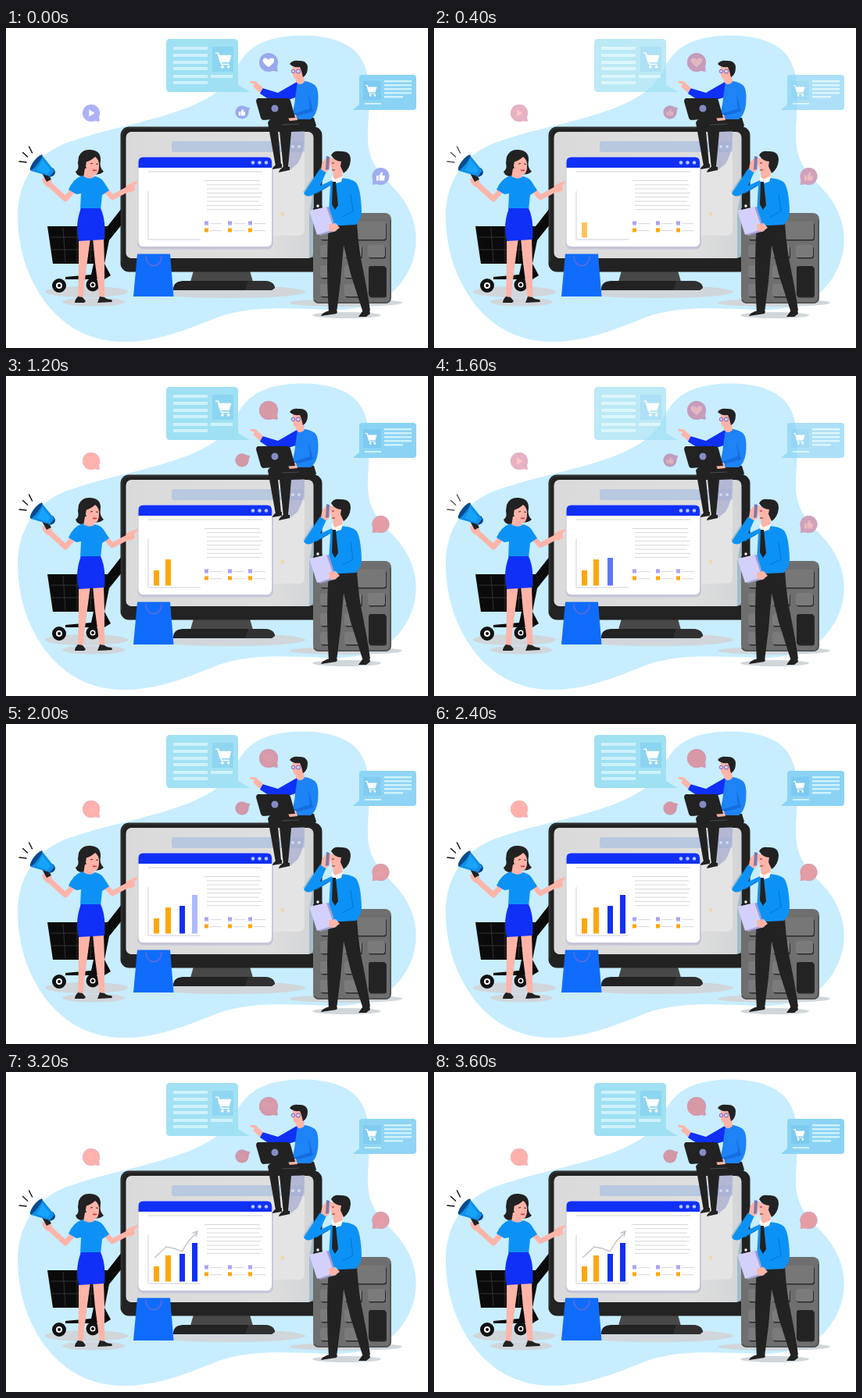
Recreate the animation shown at these times as an HTML page. Size 540 px wide and 410 px high, loop 3800 ms.

```html
<!DOCTYPE html>
<html lang="en">
<head>
<meta charset="utf-8">
<title>Online shopping</title>
<style>
html, body { margin: 0; width: 100%; height: 100%; overflow: hidden; background: #fff; }
svg { display: block; width: 540px; height: 410px; }
.ink { fill: #222; }
.sky { fill: #0c92f6; }
.blue { fill: #1030f8; }
.skin { fill: #ffb4a8; }
.limb { fill: none; stroke-linecap: round; stroke-linejoin: round; }
</style>
</head>
<body>
<svg viewBox="0 0 540 410">
  <defs>
    <linearGradient id="screen"><stop offset="0" stop-color="#dadada"/><stop offset=".75" stop-color="#dedede"/><stop offset="1" stop-color="#d3d5d7"/></linearGradient>
    <g id="trolley" fill="none" stroke="#fff" stroke-width="1.4">
      <path d="M-9-8h3l4 13h9"/>
      <path d="M-5.500-5h14l-2 7h-10z" fill="#fff"/>
      <circle cx="-1" cy="8" r="1"/><circle cx="6" cy="8" r="1"/>
    </g>
    <g id="thumb" fill="#fff">
      <path d="M-6-1h3v7h-3zM-2-1L1-6q3 0 1 5h4l-1 7h-7z"/>
    </g>
  </defs>

  <path fill="#c7edff" d="M15 240C15 200 36 160 84 145C142 125 205 117 250 94C302 70 286 42 323 21C350 6 416 3 445 28C475 55 462 107 463 143C465 185 490 192 509 221C530 253 530 291 508 323C486 355 453 362 410 361C357 359 310 356 270 371C230 387 194 402 152 402C98 402 62 374 39 334C23 306 15 274 15 240Z"/>

  <!-- ground shadows -->
  <g fill="#d0d6da">
    <ellipse cx="103" cy="338" rx="53" ry="7"/>
    <ellipse cx="112" cy="351" rx="40" ry="5.500"/>
    <ellipse cx="285" cy="338" rx="98" ry="8"/>
    <ellipse cx="435" cy="352" rx="72" ry="5"/>
    <ellipse cx="436" cy="368" rx="44" ry="4"/>
  </g>

  <!-- shopping cart -->
  <path style="fill:#0b0b0b" d="M53 254H130L148 231V252L132 272L126 302L134 317L126 322H76V319L109 316L112 302H60Z"/>
  <path fill="none" stroke="#3c3c3c" stroke-width=".8" d="M57 268h70M58 284h68M73 256l3 44M91 256v44M110 256l-2 44"/>
  <g fill="#fff" stroke="#111" stroke-width="5"><circle cx="68" cy="330" r="6.500"/><circle cx="111" cy="329" r="6"/></g>
  <circle cx="68" cy="330" r="2"/><circle cx="111" cy="329" r="2"/>

  <!-- monitor -->
  <path fill="#484848" d="M240 311h72l4 14h-80z"/>
  <path class="ink" d="M214 335q0-10 12-11h103q14 0 15 9l-4 3H214z"/>
  <path fill="#303030" d="M310 324h19q14 0 15 9l-4 3h-34z"/>
  <rect class="ink" x="146.500" y="126.500" width="258" height="186" rx="11"/>
  <path fill="none" stroke="#3d3d3d" d="M148 300V139q0-11 11-11h234"/>
  <rect x="153.500" y="133" width="240" height="162" rx="7" fill="url(#screen)"/>
  <path fill="#e4e4e4" d="M340 158h42v100q0 8-8 8h-34z"/>
  <rect x="212" y="145" width="170" height="14" rx="3" fill="#b7c8df"/>
  <path fill="#a7acd0" d="M363 132h19q1 26-9 42l-11 9z" opacity=".75"/>
  <g fill="#cfd9ee"><circle cx="367" cy="152" r="2"/><circle cx="375" cy="152" r="2"/></g>
  <circle cx="354" cy="238" r="2.500" fill="#efd9b0"/>
  <path fill="#91b3c2" d="M380 210l14-21v105h-6v-58l4-20z" opacity=".7"/>

  <!-- browser window -->
  <rect x="168.500" y="168" width="173.500" height="115.500" rx="7" fill="#bdbddb" opacity=".7"/>
  <rect x="169.500" y="165.500" width="170.500" height="114.500" rx="6" fill="#fff"/>
  <path class="blue" d="M169.500 179v-7.500q0-6 6-6h158.500q6 0 6 6v7.500z"/>
  <g fill="#b7c7ff"><circle cx="316" cy="172.500" r="2.300"/><circle cx="324.500" cy="172.500" r="2.300"/><circle cx="333" cy="172.500" r="2.300"/></g>
  <path fill="none" stroke="#e1e1e4" stroke-width="1.500" d="M182 184h146M182 209v62h67"/>
  <g id="copy"></g>
  <g id="bars"></g>
  <g id="trend" fill="none" stroke="#c3c3cf" stroke-width="1.400">
    <path d="M190 238L205 224L215 226L225 230L234 216L244 206M238.500 206.500L245 204L243 211"/>
  </g>

  <!-- bag -->
  <path fill="#0f6cfb" d="M168 289.500h42l4.500 54.500h-51.500z"/>
  <path fill="none" stroke="#5b6dd8" stroke-width="1.500" d="M179 292c0 17 20 17 20 0"/>

  <!-- calculator -->
  <rect x="393" y="237" width="100" height="116" rx="8" fill="#6f6f6f"/>
  <path fill="none" stroke="#555" stroke-width="2" d="M394 348q2 4 7 4h84q7 0 7-7V246"/>
  <g id="keys"></g>

  <!-- woman -->
  <path class="skin" d="M93 269h15l-4 30l-6 48h-6l1-47zM111 269h14l1 32v46h-6l-6-46z"/>
  <path class="ink" d="M92 344l6 1l4 5l-2 2H88q0-4 4-8zM120 344l6 1q3 3 9 3l1 3l-19 1z"/>
  <path class="limb" stroke="#ffb4a8" stroke-width="7" d="M86 208L76 219L54 199"/>
  <path class="limb" stroke="#ffb4a8" stroke-width="6.500" d="M127 207L136 217L157 206"/>
  <path class="skin" d="M154 202l8-4l6-2v2l-4 4l1 6l-7 3z"/>
  <path class="skin" d="M46 193l7-3l6 7l-4 7q-8-2-9-11z"/>
  <path class="ink" d="M93 165Q97 155 108 156Q122 157 121 170Q119 178 125 184Q119 189 112 187L98 190Q91 190 89 184Q94 181 92 173Z"/>
  <path class="skin" d="M101 180h11l1 12q-5 7-14 0z"/>
  <path class="skin" d="M103 170q7-1 11-5q6 4 5 13q0 10-7 10q-8-1-10-11z"/>
  <path class="ink" d="M101 172q9-2 13-8l-3-6l-11 4z"/>
  <path fill="none" stroke="#4b2525" d="M108 174l3-.500M115 174l3 .500"/>
  <path fill="none" stroke="#e42c45" stroke-width="1.400" d="M111 182q3 1 5 0"/>
  <path class="sky" d="M98 189q9 7 16 1q8 2 11 7l7 11l-9 6l-2 19H95l1-21l-6 1l-10-6q6-14 18-18z"/>
  <path class="blue" d="M96 231h25q7 14 5 40l-33 2q-5-22 3-42z"/>

  <!-- megaphone -->
  <path class="ink" d="M46 186l6-2l6 10l-6 3z"/>
  <path fill="#083f82" d="M53 180q7-4 10 4q0 7-9 7z"/>
  <path fill="#0e8fe6" d="M46 163L62 183L56 190L32 183Z"/>
  <path fill="#064a8f" d="M46 162q2 2-3 9t-11 12q-3-2 2-10t12-11z"/>
  <path fill="#18a3fb" d="M46 168l11 14l-4 5l-14-5q5-6 7-14z"/>
  <path id="shout" class="limb" stroke="#111" stroke-width="1.500" d="M29.500 152l4 8M21.500 159.500l6 5.500M17 171l9 1"/>

  <!-- seated man -->
  <path class="blue" d="M374 68L348 83L328 77L325 84L345 97L374 88Z"/>
  <path class="skin" d="M329 77l-10-9l-6 0l-1 2l6 2l-2 3l9 8z"/>
  <path class="ink" d="M335 121q2-6 14-6h45l3 10q-2 6-12 7l-20 1l-4 46l-6 1l-5-48l-2 0l4 43l-7 2z"/>
  <path fill="none" stroke="#4a4a4a" d="M353 124l22-1"/>
  <path class="ink" d="M347 174l6 0v5l-12 2q0-3 6-7zM356 177l7 1v4l-14 3q0-3 7-8z"/>
  <path fill="#1d83f6" d="M373 68q14-1 22 5q6 5 4 26q-2 13-9 18h-25l4-19z"/>
  <path fill="#146de0" d="M387 85l2 18l-21 7l2 3l23-6z"/>
  <path class="skin" d="M369 61h12l1 8q-5 6-10 1zM360 113l11-2l2 7l-10 1z"/>
  <path class="skin" d="M367 49h14v11q-5 7-11 5q-4-1-3-16z"/>
  <path class="ink" d="M363 46q4-5 11-4q11-1 12 8q0 10-6 13l-2-8l-2-5q-9 1-13-4z"/>
  <g fill="#c9d4f5" stroke="#8a55b0" stroke-width="1"><circle cx="367.500" cy="55.500" r="2.200"/><circle cx="374" cy="55.500" r="2.600"/></g>
  <path class="ink" d="M322 90h38q3 0 4 3l6 22l-41 3q-2 0-3-3l-6-21q0-3 2-4z"/>
  <circle cx="344" cy="103" r="4.500" fill="#868bc8"/>

  <!-- standing man -->
  <path class="ink" d="M413 251l36-2q2 34 8 61q6 30 9 52l-9 3q-8-25-16-50l-9-37l-4 47l-5 40h-10q-4-60 0-114z"/>
  <path class="ink" d="M414 362l10 1l-1 3l-20 3q1-4 11-7zM456 363l9-2l1 5l-5 4h-10z"/>
  <path class="sky" d="M424 192q18 0 24 6q6 8 7 36q0 10-5 15l-2 3l-36 2l3-52l-23 12q-7 4-11-2l21-32l8 4l-8 18z"/>
  <path fill="none" stroke="#0874cf" d="M441 213l3 22l-14 7M412 203l-15 9"/>
  <path class="skin" d="M403 181q1-13 10-16l4 2l-3 15l-5 3z"/>
  <path fill="#777baf" d="M410 164l4 1l-1 16l-4 1z"/>
  <path class="skin" d="M418 182h13l-1 11q-6 6-11 0z"/>
  <path class="skin" d="M416 167h16v13q-5 8-11 7q-6-2-5-20z"/>
  <path class="ink" d="M416 163q3-6 11-5q14-1 14 11q-1 12-9 17l-4-9l1-6q-8 0-13-8z"/>
  <path fill="none" stroke="#633" d="M417 173h3M417 182h4"/>
  <path fill="#fff" d="M417 189l4 5l10-4l-2 7l-7 2l-5-3z"/>
  <path class="ink" d="M418 197h4l3 30l-4 6l-4-7z"/>
  <path fill="#9e9fd3" d="M391 234l22-5l10 31l-22 6z"/>
  <path fill="#d3d1fb" d="M388 234l22-5l10 29l-22 7z"/>
  <path fill="none" stroke="#222" stroke-width="1.800" d="M393 232l12-3"/>
  <circle cx="399" cy="228" r="2.200" fill="#fff" stroke="#222"/>
  <path class="skin" d="M413 252l9-2l5 6l-7 5l-6-1z"/>

  <g id="cards">
    <path fill="#9fe0f3" d="M210 14h82q5 0 5 5v54l15 9H210q-5 0-5-5V19q0-5 5-5z"/>
    <rect x="264" y="24" width="27" height="32" fill="#8cd5f1"/>
    <use href="#trolley" transform="translate(278 41) scale(1.1)"/>
    <path fill="#8bd3f5" d="M456 60h65q4 0 4 4v37q0 4-4 4H444l8-7V64q0-4 4-4z"/>
    <rect x="457" y="68" width="23" height="24" fill="#7dcaf0"/>
    <use href="#trolley" transform="translate(467 80) scale(.8)"/>
    <g id="cardLines" fill="#cdf2fc"></g>
  </g>
  <g id="bubbles"></g>
</svg>
<script>
const STEP = 200, LOOP = 3800, FADE = 600, PULSE_STEPS = 6;
const easeOut = x => 1 - (1 - x) ** 3;
const el = id => document.getElementById(id);
const add = (id, markup) => el(id).insertAdjacentHTML('beforeend', markup);
const box = (x, y, w, h, fill, more = '') =>
  `<rect x="${x}" y="${y}" width="${w}" height="${h}"${fill ? ` fill="${fill}"` : ''} ${more}/>`;

for (let i = 0; i < 8; i++) add('copy', box(257 - (i ? 0 : 3), 195 + i * 5.3, 71 - (i % 3) * 2, 1, '#d7d7da'));
for (const x of [254, 284, 310]) {
  add('copy', box(x, 247.5, 5, 5, '#aaa4f5') + box(x, 256.5, 5, 5, '#ffa60a'));
  for (const y of [250, 259]) add('copy', box(x + 7, y, 15, 1.2, '#dddde2'));
}

const bars = [[189, 249, '#ffa60a'], [204, 235, '#ffa60a'], [222, 233, '#1030f8'], [238, 219, '#1030f8']];
bars.forEach(([x, y, fill]) => add('bars', box(x, y, 7, 268.5 - y, fill)));

const key = (x, y, w, h, fill = '#7b7b7b') =>
  box(x + 1, y + 1.5, w, h, '#2b2b2b', 'rx="3"') + box(x, y, w, h, fill, 'rx="3"');
add('keys', key(402, 248, 84, 23, '#777'));
for (const y of [278, 304, 328])
  for (const x of [402, 433, 463])
    if (x < 463 || y < 300) add('keys', key(x, y, 22, 16));
add('keys', key(464, 305, 22, 39, '#232323'));

for (const y of [24, 33, 42, 50, 60, 68]) add('cardLines', box(214, y, 44, 4));
add('cardLines', box(262, 60, 28, 4));
for (let i = 0; i < 5; i++) add('cardLines', box(484, 67 + i * 5, i < 4 ? 35 : 24, 2.5));
add('cardLines', box(459, 96, 21, 2));

const heart = '<path fill="#fff" d="M0 6C-14-3-4-9 0-3C4-9 14-3 0 6Z"/>';
const play = '<path fill="#fff" d="M-3-5L5 0L-3 5Z"/>';
const thumb = '<use href="#thumb"/>';
const bubbles = [
  [336, 44, 12, 45, '#98a9ed', '#d899a7', heart],
  [109, 109, 11, 45, '#acb1f8', '#ffb2ac', play],
  [302, 108, 8.5, -30, '#98a9ed', '#d497a6', thumb],
  [479.5, 190, 11, 135, '#a1adef', '#e49da5', thumb]
];
for (const [x, y, r, turn, cool, warm, icon] of bubbles) {
  const shape = (fill, cls) => `<g fill="${fill}" class="${cls}"><circle r="${r}"/>
    <path transform="rotate(${turn})" d="M${r * .7}-${r * .55}L${r * 1.38} 0L${r * .7} ${r * .55}Z"/></g>`;
  add('bubbles', `<g transform="translate(${x} ${y})">${shape(cool, 'cool')}
    <g transform="scale(${r / 12})">${icon}</g>${shape(warm, 'warm')}</g>`);
}

const warmShapes = document.querySelectorAll('.warm');
const reveals = [...el('bars').children, el('trend')];
const start = performance.now();

function draw() {
  const step = Math.floor((performance.now() - start) % LOOP / STEP);
  const pulse = step ? easeOut(((step - 1) % PULSE_STEPS + 1) / PULSE_STEPS) : 0;
  // The loop opens at rest: cards shown, bubbles still cool.
  el('cards').style.opacity = el('shout').style.opacity = step ? pulse : 1;
  warmShapes.forEach(w => w.style.opacity = pulse);
  reveals.forEach((part, i) => {
    part.style.opacity = Math.min(1, Math.max(0, (step * STEP - i * FADE) / FADE));
  });
  requestAnimationFrame(draw);
}
draw();
</script>
</body>
</html>
```
